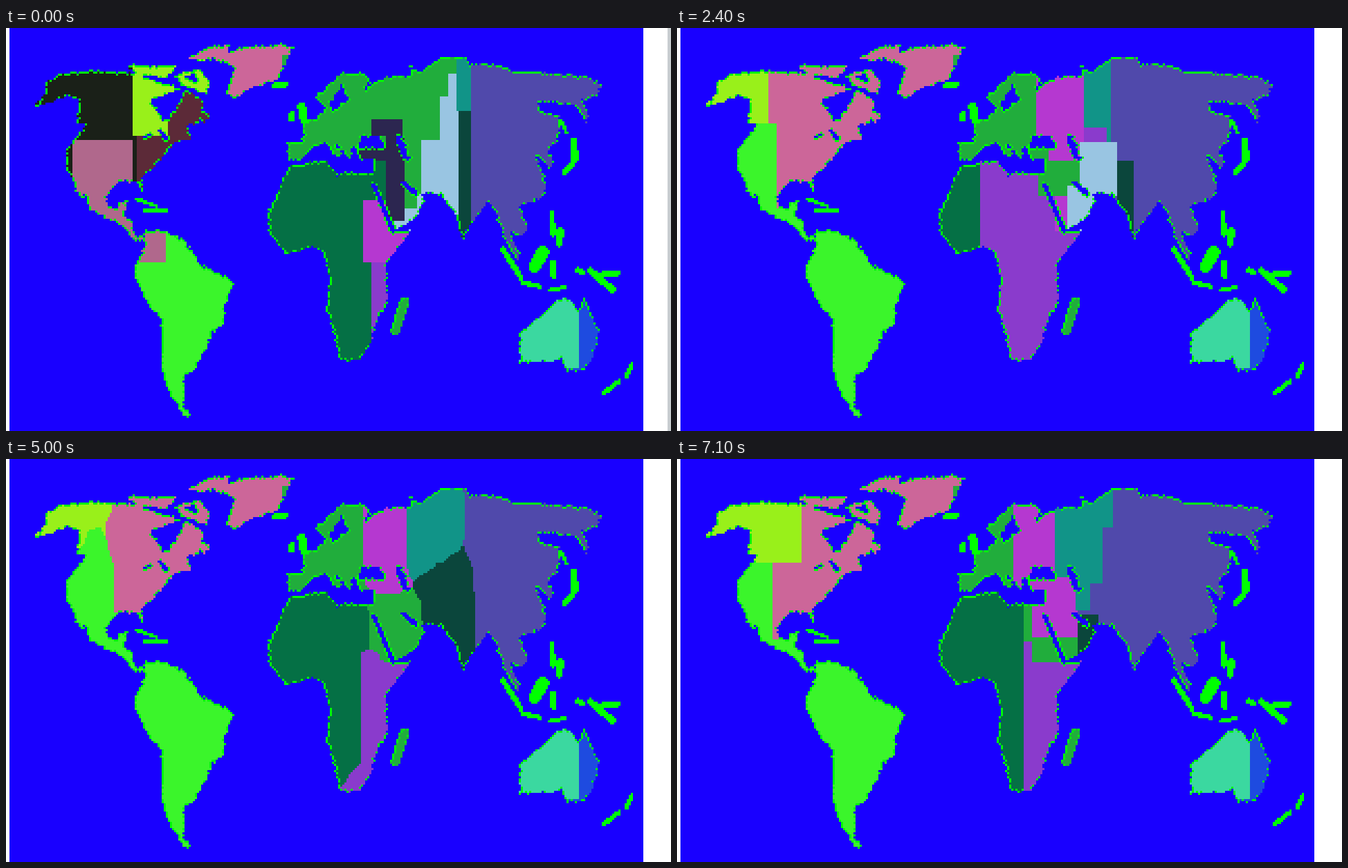
A matplotlib script that plays this animation: 961 by 583 pixels, repeating every 7200 ms.

```python
import numpy as np
import matplotlib.pyplot as plt
from matplotlib.animation import FuncAnimation
from matplotlib.colors import to_rgb
from matplotlib.path import Path

W, H, CELL, FRAMES = 961, 583, 3, 72
NX, NY = -(-W // CELL), -(-H // CELL)
REACH = 25  # longest distance, in cells, that borders feel

COLORS = dict(
    slate="#5049ab", leaf="#3bf52b", pink="#cc6699", lemon="#99f01a",
    black="#1a2018", brown="#5c2a38", mauve="#b0688c", forest="#057045",
    purple="#8a3bcc", magenta="#b538d0", green="#21ad3c", navy="#2c2650",
    sky="#99c5e2", teal="#119488", pine="#0b463c", aqua="#3bd8a0",
    azure="#1e4be0")
NAMES = list(COLORS)
PALETTE = np.array([to_rgb(c) for c in COLORS.values()])
SEA, LIME = to_rgb("#1900ff"), to_rgb("#00ff00")

rng = np.random.default_rng(5)
gx, gy = np.meshgrid((np.arange(NX) + 0.5) * CELL, (np.arange(NY) + 0.5) * CELL)
# Slightly shaken sample points give ragged shores.
points = np.column_stack([gx.ravel(), gy.ravel()])
points += rng.normal(0, 0.9, points.shape)
land = np.zeros((NY, NX), bool)
isles = np.zeros((NY, NX), bool)


def shape(*pts, value=True):
    land[Path(pts).contains_points(points).reshape(NY, NX)] = value


def stroke(mask, x0, y0, x1, y1, width, value=True):
    dx, dy = x1 - x0, y1 - y0
    t = np.clip(((gx - x0) * dx + (gy - y0) * dy) / (dx * dx + dy * dy), 0, 1)
    near = np.hypot(gx - x0 - t * dx, gy - y0 - t * dy) < width / 2
    mask[near] = value


def box(mask, x0, y0, x1, y1, value=True):
    mask[(gx >= x0) & (gx < x1) & (gy >= y0) & (gy < y1)] = value


# North America and Hudson Bay
shape((38, 116), (58, 92), (56, 80), (80, 66), (128, 62), (180, 65),
      (228, 80), (262, 90), (285, 105), (283, 118), (295, 125), (294, 133),
      (262, 141), (268, 160), (243, 166), (225, 188), (196, 218), (200, 240),
      (190, 224), (163, 222), (144, 245), (147, 258), (162, 262), (163, 252),
      (175, 250), (170, 272), (181, 278), (185, 300), (203, 303), (188, 309),
      (165, 284), (122, 264), (107, 224), (113, 247), (105, 241), (87, 202),
      (87, 178), (116, 140), (102, 136), (106, 104), (90, 98), (62, 108))
shape((209, 104), (232, 95), (262, 86), (236, 131), (226, 133), (218, 116),
      value=False)
# Arctic islands and Greenland
shape((175, 55), (220, 55), (247, 54), (233, 72), (188, 68))
shape((244, 68), (280, 60), (296, 80), (290, 95), (252, 82))
shape((255, 70), (274, 66), (276, 80), value=False)
shape((260, 46), (290, 28), (325, 23), (320, 37), (287, 48))
shape((302, 43), (345, 27), (398, 25), (416, 27), (404, 52), (392, 74),
      (352, 88), (330, 101), (318, 92), (330, 62), (322, 52), (306, 50))
# South America
shape((200, 293), (225, 293), (256, 306), (274, 328), (276, 340), (322, 362),
      (328, 372), (317, 402), (315, 428), (298, 440), (286, 470), (270, 498),
      (258, 502), (257, 548), (271, 562), (258, 562), (237, 530), (226, 500),
      (224, 420), (208, 405), (187, 362), (187, 345), (200, 318))
# Europe, western Asia and the inner seas
shape((407, 165), (428, 164), (430, 140), (461, 122), (461, 112), (447, 100),
      (485, 65), (515, 65), (528, 76), (518, 87), (548, 71), (585, 69),
      (584, 55), (596, 66), (628, 42), (660, 42), (660, 240), (628, 241),
      (598, 238), (606, 248), (590, 278), (558, 292), (530, 222), (532, 190),
      (510, 190), (504, 171), (497, 176), (499, 190), (476, 166), (485, 181),
      (478, 189), (462, 166), (440, 174), (426, 192), (407, 190))
shape((486, 80), (489, 96), (498, 102), (470, 121), (468, 109), value=False)
shape((510, 173), (514, 157), (539, 156), (546, 173), value=False)
shape((562, 157), (571, 155), (584, 191), (574, 190), value=False)
# Eastern Asia
shape((655, 42), (664, 42), (668, 52), (704, 52), (735, 62), (835, 69),
      (864, 82), (852, 99), (832, 104), (841, 120), (840, 137), (820, 110),
      (768, 107), (775, 122), (800, 128), (800, 158), (782, 178), (792, 192),
      (786, 203), (764, 182), (775, 206), (781, 232), (776, 246), (743, 258),
      (755, 292), (742, 303), (727, 290), (743, 330), (738, 337), (721, 305),
      (706, 262), (697, 250), (670, 286), (660, 307), (648, 267), (628, 240))
# Africa
shape((410, 200), (462, 190), (480, 215), (490, 208), (531, 212), (560, 295),
      (584, 293), (550, 341), (551, 403), (536, 418), (525, 460), (510, 481),
      (484, 481), (464, 405), (468, 362), (458, 325), (448, 317), (405, 327),
      (379, 293), (380, 265))
# Australia
shape((743, 440), (778, 412), (800, 391), (815, 391), (828, 411), (836, 388),
      (857, 440), (848, 478), (835, 493), (810, 497), (804, 480), (741, 485))

stroke(land, 532, 228, 558, 290, 6, value=False)
stroke(land, 574, 224, 592, 239, 7, value=False)
stroke(land, 222, 149, 232, 160, 5, value=False)
stroke(land, 200, 158, 210, 153, 4, value=False)
stroke(land, 576, 396, 563, 437, 14)

for isle in (
        (427, 113, 431, 134, 12), (414, 123, 412, 131, 9),
        (388, 84, 403, 82, 9), (821, 163, 822, 190, 10),
        (819, 196, 807, 208, 9), (803, 135, 810, 152, 5),
        (789, 268, 790, 298, 8), (801, 293, 800, 312, 10),
        (718, 320, 744, 361, 8), (748, 369, 772, 374, 7),
        (764, 345, 776, 324, 18), (790, 340, 791, 358, 9),
        (844, 351, 876, 378, 10), (854, 358, 885, 354, 9),
        (904, 487, 897, 503, 7), (886, 511, 863, 529, 7),
        (188, 247, 218, 258, 5), (200, 264, 233, 265, 5),
        (787, 379, 808, 375, 6), (826, 350, 834, 354, 8)):
    stroke(isles, *isle)


def coast(land):
    """Bare cells along the shore, denser on the west and north sides."""
    pad = np.pad(land, 1)
    west_north = ~(pad[1:-1, :-2] & pad[:-2, 1:-1])
    east_south = ~(pad[1:-1, 2:] & pad[2:, 1:-1])
    chance = np.where(west_north, 0.8, np.where(east_south, 0.3, 0.0))
    return land & (rng.random(land.shape) < chance)


def distance(mask):
    """City-block distance to the mask, capped at REACH."""
    d = np.where(mask, 0.0, REACH)
    for axis in (0, 1):
        ramp = np.arange(d.shape[axis], dtype=float)
        ramp = ramp[:, None] if axis == 0 else ramp[None, :]
        for _ in range(2):
            d = np.minimum.accumulate(d - ramp, axis=axis) + ramp
            d = np.flip(d, axis)
    return d


COMMON = (
    ("leaf", (0, 0, 345, H)), ("pink", (100, 0, 425, 262)),
    ("leaf", (158, 238, 345, H)), ("purple", (370, 192, 600, 490)),
    ("slate", (556, 192, 600, 292)), ("green", (553, 385, 590, 450)),
    ("azure", (730, 380, 880, 510)), ("aqua", (730, 380, 829, 491)))
keys = []


def key(frame, *regions):
    owner = np.zeros((NY, NX), int)
    for name, *rects in COMMON + regions:
        for rect in rects:
            box(owner, *rect, value=NAMES.index(name))
    field = [distance(owner == i) - distance(owner != i) for i in range(len(NAMES))]
    keys.append((frame, np.array(field, np.float32)))


def layout(west, africa, asia):
    """Usual regions, from their eastern borders."""
    lemon, leaf, split = west
    green, magenta, teal = asia
    return (("lemon", (0, 50, lemon, split)), ("leaf", (80, split, leaf, 300)),
            ("teal", (400, 40, teal, 192)), ("magenta", (400, 40, magenta, 192)),
            ("green", (400, 40, green, 192)), ("forest", (370, 193, *africa)))


key(0,
    ("black", (0, 50, 188, 222)), ("lemon", (182, 45, 300, 156)),
    ("brown", (188, 156, 240, 245), (235, 92, 300, 170)),
    ("mauve", (97, 162, 182, 310), (182, 250, 231, 338)),
    ("green", (400, 40, 652, 275)),
    ("magenta", (515, 248, 592, 339)), ("forest", (370, 193, 515, 490),
                                        (515, 193, 549, 248), (515, 339, 527, 490)),
    ("sky", (640, 65, 656, 290), (628, 100, 656, 290), (600, 162, 656, 245),
     (557, 240, 608, 294)),
    ("green", (576, 210, 594, 262)),
    ("teal", (650, 40, 671, 120)), ("pine", (655, 119, 673, 312)),
    ("navy", (528, 131, 573, 156), (505, 170, 550, 191), (549, 155, 576, 278)))
key(16, *layout((118, 118, 138), (408, 332), (521, 554, 592)),
    ("green", (521, 55, 551, 90)),
    ("purple", (521, 119, 580, 157), (500, 157, 582, 294)),
    ("teal", (582, 175, 594, 278)),
    ("pine", (588, 155, 640, 245), (640, 174, 671, 312)),
    ("sky", (588, 210, 608, 278)))
key(24, *layout((133, 145, 137), (439, 332), (518, 587, 628)),
    ("green", (505, 172, 537, 192), (521, 192, 582, 242)),
    ("purple", (587, 143, 622, 166)), ("magenta", (545, 242, 564, 294)),
    ("sky", (582, 166, 637, 242), (564, 228, 608, 294)),
    ("pine", (637, 192, 661, 312)))
key(35, *layout((145, 131, 152), (520, 449), (509, 613, 631)),
    ("green", (530, 211, 613, 294)), ("magenta", (530, 192, 588, 211)),
    ("sky", (607, 137, 640, 162), (588, 162, 646, 217), (613, 180, 668, 312)),
    ("pine", (664, 156, 682, 290)))
key(42, *layout((135, 131, 140), (512, 437), (524, 576, 671)),
    ("green", (509, 178, 628, 280), (545, 278, 600, 292)),
    ("pine", (628, 150, 698, 312), (661, 122, 698, 150)),
    ("slate", (622, 150, 630, 191)))
key(57, *layout((176, 173, 136), (514, 490), (509, 582, 653)),
    ("leaf", (97, 82, 155, 136)), ("forest", (514, 192, 549, 278)),
    ("green", (537, 212, 585, 294)), ("magenta", (526, 192, 580, 212)),
    ("pine", (579, 150, 653, 245), (632, 122, 653, 150), (640, 192, 661, 312),
     (585, 238, 608, 282)))
key(71, *layout((179, 137, 150), (501, 490), (485, 545, 631)),
    ("slate", (616, 100, 640, 192), (597, 180, 640, 192)),
    ("magenta", (505, 172, 579, 259)),
    ("green", (500, 205, 512, 264), (512, 259, 579, 294)),
    ("teal", (576, 180, 597, 218)), ("pine", (579, 225, 608, 285)))

bare = coast(land) | isles
filled = land & ~bare
stage = np.empty((NY, NX, 3))
stage[:] = SEA
stage[bare] = LIME


def owners(frame):
    """Blend the border fields of the two nearest keys."""
    for (a, before), (b, after) in zip(keys, keys[1:]):
        if frame <= b:
            u = (frame - a) / (b - a)
            return np.argmin(before * (1 - u) + after * u, axis=0)


fig = plt.figure(figsize=(W / 100, H / 100), dpi=100, facecolor="white")
ax = fig.add_axes([0, 0, 1, 1])
ax.axis("off")
image = ax.imshow(stage, extent=(0, NX * CELL, NY * CELL, 0),
                  interpolation="nearest", aspect="auto")
ax.set_xlim(0, W)
ax.set_ylim(H, 0)
for x, width in ((0, 5), (921, 40)):
    ax.add_patch(plt.Rectangle((x, 0), width, H, color="white", lw=0))
strip = ax.add_patch(plt.Rectangle((956, 0), 5, H, color="#c8cdd0", lw=0))


def draw(frame):
    picture = stage.copy()
    picture[filled] = PALETTE[owners(frame)[filled]]
    image.set_data(picture)
    strip.set_visible(frame == 0)
    return image, strip


anim = FuncAnimation(fig, draw, frames=FRAMES, interval=100, repeat=True)
plt.show()
```
